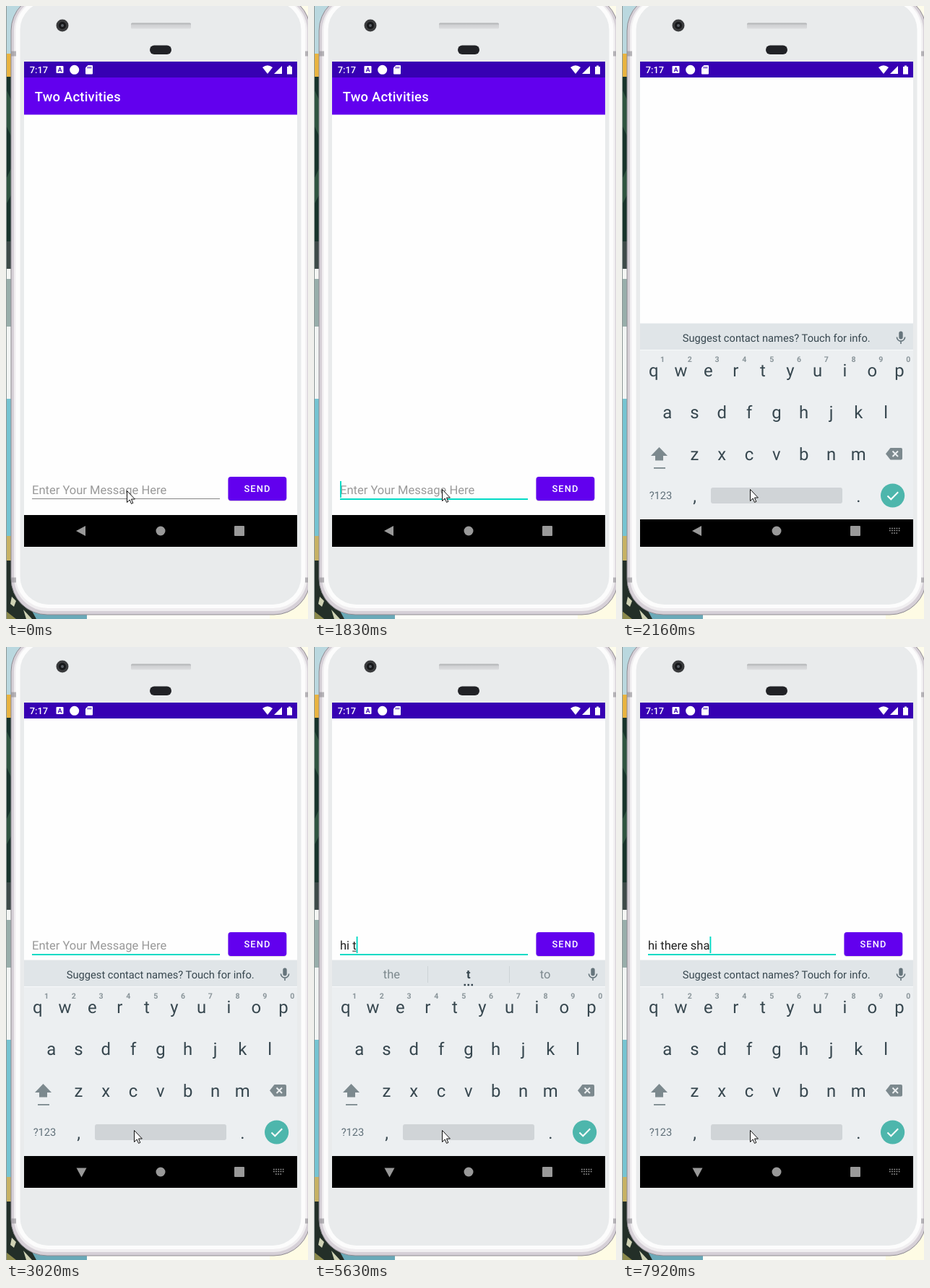
Write an HTML page that moves like this. It is 418 by 849 pixels and loops after 8000 ms.

```html
<!DOCTYPE html>
<html lang="en">
<head>
<meta charset="utf-8">
<title>Two Activities</title>
<style>
  html, body { margin: 0; width: 100%; height: 100%; overflow: hidden; background: #fdfdf8; }
  svg { display: block; width: 418px; height: 849px; }
  text { font-family: Roboto, sans-serif; text-rendering: geometricPrecision; white-space: pre; }
  .mid { text-anchor: middle; }
  .body { font-size: 16.54px; }
  .title { font-size: 18.37px; font-weight: 500; letter-spacing: .23px; fill: #fff; }
  .send { font-size: 12.86px; font-weight: 500; letter-spacing: 1.15px; fill: #fff; }
  .clock { font-size: 12.86px; font-weight: 500; fill: #fff; }
  .key { font-size: 23.9px; fill: #37474f; }
  .num { font-size: 10.6px; font-weight: 700; fill: #8a959a; }
  .small { font-size: 14.7px; }
  .side { fill: #7d898e; }
  .best { fill: #37474f; font-weight: 700; }
</style>
</head>
<body>
<svg viewBox="0 0 418 849" xmlns="http://www.w3.org/2000/svg">
  <defs>
    <clipPath id="screen"><rect x="25" y="77" width="378" height="672"/></clipPath>
    <linearGradient id="slot" x2="0" y2="1">
      <stop offset="0" stop-color="#a9abad"/>
      <stop offset=".35" stop-color="#cfd0d2"/>
      <stop offset="1" stop-color="#dcdddf"/>
    </linearGradient>
  </defs>

  <!-- wallpaper -->
  <rect width="418" height="849" fill="#fdfdf8"/>
  <rect x="380" width="38" height="70" fill="#fefcea"/>
  <rect x="365" y="780" width="53" height="69" fill="#fefbe4"/>
  <g>
    <rect width="40" height="66" fill="#bad8df"/>
    <rect y="66" width="9" height="32" fill="#e9b440"/>
    <rect y="98" width="9" height="228" fill="#17332a"/>
    <path d="M0 115L7 130V180L0 165ZM0 240L7 225V262L0 275Z" fill="#2f5440"/>
    <rect y="326" width="9" height="38" fill="#3d4a48"/>
    <rect y="364" width="9" height="14" fill="#f4f6f4"/>
    <rect y="378" width="9" height="66" fill="#98aeab"/>
    <rect y="444" width="9" height="100" fill="#f2f5f4"/>
    <rect y="544" width="9" height="190" fill="#76c4d2"/>
    <rect y="734" width="9" height="34" fill="#c7b264"/>
    <path d="M0 768H10L60 849H0Z" fill="#232f28"/>
    <path d="M36 838H112V849H42Z" fill="#6aa9b8"/>
    <path d="M8 818L14 824 11 832 6 828ZM24 836L36 849H28Z" fill="#cfd2b4"/>
    <path d="M0 838L14 849H0Z" fill="#8c8a4c"/>
    <path d="M.5 0V849" stroke="#8d9796" fill="none"/>
  </g>

  <!-- phone body -->
  <rect x="7" y="-16" width="414" height="859" rx="50" fill="#d6d0d7" stroke="#8f8b92"/>
  <rect x="11" y="-13" width="406" height="851" rx="47" fill="#f0eef0"/>
  <rect x="13.500" y="-11" width="401" height="845" rx="44" fill="#fcfcfc"/>
  <rect x="19.500" y="-6" width="389" height="835" rx="39" fill="#e9ebec"/>
  <path d="M7 66H14M414 66H418M7 795H14M414 795H418" stroke="#8f8d92" stroke-width="7" opacity=".6"/>
  <circle cx="78" cy="27" r="8.500" fill="#3a3b3d"/>
  <circle cx="78" cy="27" r="5" fill="#17181a"/>
  <circle cx="78" cy="27" r="2" fill="#5b6066"/>
  <rect x="173" y="23.500" width="83" height="8" rx="1.500" fill="url(#slot)"/>
  <rect x="199" y="54.500" width="30" height="12.500" rx="6.200" fill="#212226"/>

  <g clip-path="url(#screen)">
    <rect x="25" y="77" width="378" height="672"/>

    <g id="app">
      <rect x="25" y="99" width="378" height="606" fill="#fefefe"/>
      <rect x="25" y="99" width="378" height="51.500" fill="#6200ee"/>
      <text class="title" x="39.700" y="132">Two Activities</text>
      <text id="hint" class="body" x="36" y="676" fill="#999">Enter Your Message Here</text>
      <text id="typed" class="body" x="36" y="676" fill="#212121"></text>
      <rect id="wordLine" y="677.700" height="1" fill="#212121"/>
      <rect x="36" y="682" width="260" height="1" fill="#858585"/>
      <rect id="focusLine" x="36" y="682" width="260" height="2" fill="#03dac5"/>
      <rect id="caret" y="658" width="1.900" height="23" fill="#03dac5"/>
      <rect x="307.450" y="653" width="80.850" height="33" rx="3.700" opacity=".12"/>
      <rect x="307.450" y="652" width="80.850" height="33" rx="3.700" fill="#6200ee"/>
      <text class="send" x="329.400" y="673">SEND</text>
    </g>

    <g id="statusBar" fill="#fff">
      <rect x="25" y="77" width="378" height="22" fill="#3700b3"/>
      <text class="clock" x="32.800" y="93">7:17</text>
      <rect x="69.500" y="83" width="10" height="10" rx="1"/>
      <text class="mid" x="74.500" y="91.200" font-size="8.500" font-weight="700" fill="#3700b3">A</text>
      <circle cx="94.700" cy="88.300" r="6.500"/>
      <path d="M113.500 82H119Q120 82 120 83V93.500Q120 94.500 119 94.500H111Q110 94.500 110 93.500V85.500Z"/>
      <path d="M113.500 84V86.500M115.500 84V86.500M117.500 84V86.500" stroke="#3700b3"/>
      <path d="M355 85Q362 79.500 369 85L362 94Z"/>
      <path d="M371 94L382 83V94Z"/>
      <path d="M389 84H391V82.500H394V84H396V94.500H389Z"/>
    </g>

    <g id="keyboard">
      <rect x="25" y="433" width="378" height="1" fill="#f1f3f4"/>
      <rect x="25" y="434" width="378" height="271" fill="#eceff1"/>
      <rect x="25" y="434" width="378" height="36" fill="#e0e5e8"/>
      <rect x="25" y="470" width="378" height="1" fill="#f7f9fa"/>
      <rect x="25" y="705" width="378" height="44"/>

      <text id="notice" class="small mid" x="213.700" y="458.600" fill="#37474f">Suggest contact names? Touch for info.</text>
      <g id="words">
        <path d="M157.500 442V465M270.500 442V465" stroke="#cdd3d6"/>
        <text class="body mid side" x="107.500" y="459"></text>
        <text class="body mid best" x="213.700" y="459"></text>
        <text class="body mid side" x="320" y="459"></text>
        <path d="M207.500 468H220" stroke="#37474f" stroke-width="2.500" stroke-dasharray="2.500 2.500"/>
      </g>
      <g fill="none" stroke="#66757c" stroke-width="1.600">
        <rect x="383.300" y="444.500" width="5.400" height="11" rx="2.700" fill="#66757c" stroke="none"/>
        <path d="M380.400 452.500A5.600 5.600 0 0 0 391.600 452.500M386 458V462"/>
      </g>

      <g id="keys"></g>
      <path d="M51.500 605L63 617H57V623.500H46V617H40Z" fill="#7c898e"/>
      <rect x="44" y="633" width="16" height="1.800" fill="#7c898e"/>
      <path d="M371.500 606H386Q388 606 388 608V620.500Q388 622.500 386 622.500H371.500L365 614.200Z" fill="#7c898e"/>
      <path d="M374.500 610.500L382 618M382 610.500L374.500 618" stroke="#eceff1" stroke-width="2"/>
      <text class="small mid" x="53.500" y="677.200" fill="#607079">?123</text>
      <rect x="123" y="661" width="182" height="22" rx="3" fill="#d0d4d7"/>
      <circle cx="374.600" cy="672" r="16.600" fill="#4db6ac"/>
      <path d="M367.500 672.500L372.300 677.300 382.200 667.200" fill="none" stroke="#fff" stroke-width="2"/>
    </g>

    <g fill="#fff" opacity=".6">
      <path id="back" d="M97 727L110 720V734Z"/>
      <circle cx="214" cy="727" r="6.500"/>
      <rect x="316" y="720" width="14" height="14" rx="1"/>
      <path id="imeIcon" d="M370 723.500H385M370 726.500H385M373 730H382" fill="none" stroke="#fff" stroke-width="1.600" stroke-dasharray="1.700 1.500"/>
    </g>
  </g>

  <path id="pointer" d="M.5 .5V16.500L4.200 13 6.500 18.400 8.800 17.400 6.500 12H11.400Z" fill="#fff" stroke="#111"/>
</svg>

<script>
const LOOP = 8000;
const $ = id => document.getElementById(id);
const pen = document.createElement('canvas').getContext('2d');
pen.font = '16.54px Roboto, sans-serif';
const textWidth = s => pen.measureText(s).width;

function addKey(label, x, y, cls = 'key') {
  const t = document.createElementNS('http://www.w3.org/2000/svg', 'text');
  t.setAttribute('class', cls + ' mid');
  t.setAttribute('x', x);
  t.setAttribute('y', y);
  t.textContent = label;
  $('keys').append(t);
}

const PITCH = 37.8;
[['qwertyuiop', 43.8, 507.4], ['asdfghjkl', 62.7, 565.1], ['zxcvbnm', 100.5, 622.8]]
  .forEach(([row, x, y]) => [...row].forEach((c, i) => addKey(c, x + i * PITCH, y)));
[...'1234567890'].forEach((c, i) => addKey(c, 56 + i * PITCH, 487, 'num'));
addKey(',', 100.5, 681);
addKey('.', 327.3, 681);

// drop: keyboard distance below rest, null while hidden; word: start of the underlined word
const start = {
  pointer: [167, 671], focus: 0, caret: 0, pan: 0, drop: null, alpha: 1,
  turn: 0, text: '', word: null, words: null
};
const steps = [
  [150, { pointer: [164, 666] }],
  [440, { focus: .5, caret: 1 }],
  [590, { focus: 1 }],
  [1050, { caret: 0 }],
  [1330, { pointer: [168, 667] }],
  [1590, { pointer: [173, 668], caret: 1 }],
  [1720, { pointer: [177, 669] }],
  [1980, { caret: 0, pan: 32, drop: 178, alpha: .33 }],
  [2160, { pan: 160, drop: 6, alpha: 1 }],
  [2310, { pan: 245, drop: 0, turn: -45 }],
  [2440, { pan: 257, turn: -90, caret: 1 }],
  [3020, { caret: 0 }],
  [3420, { caret: 1, text: 'h', word: 0 }],
  [3550, { words: ['he', 'h', 'have'] }],
  [3800, { text: 'hi' }],
  [3930, { words: ['Hi', 'hi', 'his'] }],
  [4490, { caret: 0 }],
  [4780, { caret: 1, text: 'hi ', word: null }],
  [4910, { words: null }],
  [5360, { text: 'hi t', word: 3 }],
  [5500, { words: ['the', 't', 'to'] }],
  [6090, { caret: 0 }],
  [6520, { caret: 1 }],
  [6930, { text: 'hi th', words: ['the', 'th', 'this'] }],
  [7070, { text: 'hi the', words: ['they', 'the', 'there'] }],
  [7220, { text: 'hi ther', words: ['there', 'ther', 'their'] }],
  [7360, { text: 'hi there', words: ['There', 'there', 'theirs'] }],
  [7500, { text: 'hi there ', word: null, words: null }],
  [7640, { text: 'hi there s' }],
  [7780, { text: 'hi there sh' }],
  [7920, { text: 'hi there sha' }]
];

const show = (id, on) => $(id).setAttribute('visibility', on ? 'inherit' : 'hidden');
const set = (id, name, value) => $(id).setAttribute(name, value);
const wordSlots = document.querySelectorAll('#words text');

function draw(s) {
  set('pointer', 'transform', `translate(${s.pointer})`);
  set('app', 'transform', `translate(0 ${-s.pan})`);
  set('focusLine', 'opacity', s.focus);

  const end = 36 + textWidth(s.text);
  $('typed').textContent = s.text;
  show('hint', !s.text);
  show('caret', s.caret);
  set('caret', 'x', end);
  show('wordLine', s.word !== null);
  if (s.word !== null) {
    const left = 36 + textWidth(s.text.slice(0, s.word));
    set('wordLine', 'x', left);
    set('wordLine', 'width', end - left);
  }

  const open = s.drop !== null;
  show('keyboard', open);
  show('imeIcon', open);
  set('keyboard', 'transform', `translate(0 ${s.drop || 0})`);
  set('keyboard', 'opacity', s.alpha);
  set('back', 'transform', `rotate(${s.turn} 104.500 727)`);
  show('notice', open && !s.words);
  show('words', open && s.words);
  wordSlots.forEach((slot, i) => slot.textContent = s.words ? s.words[i] : '');
}

const t0 = performance.now();
let last = -1;
function tick() {
  const t = (performance.now() - t0) % LOOP;
  const passed = steps.filter(([at]) => at <= t);
  if (passed.length !== last) {
    last = passed.length;
    draw(Object.assign({}, start, ...passed.map(([, change]) => change)));
  }
  requestAnimationFrame(tick);
}
tick();
</script>
</body>
</html>
```
